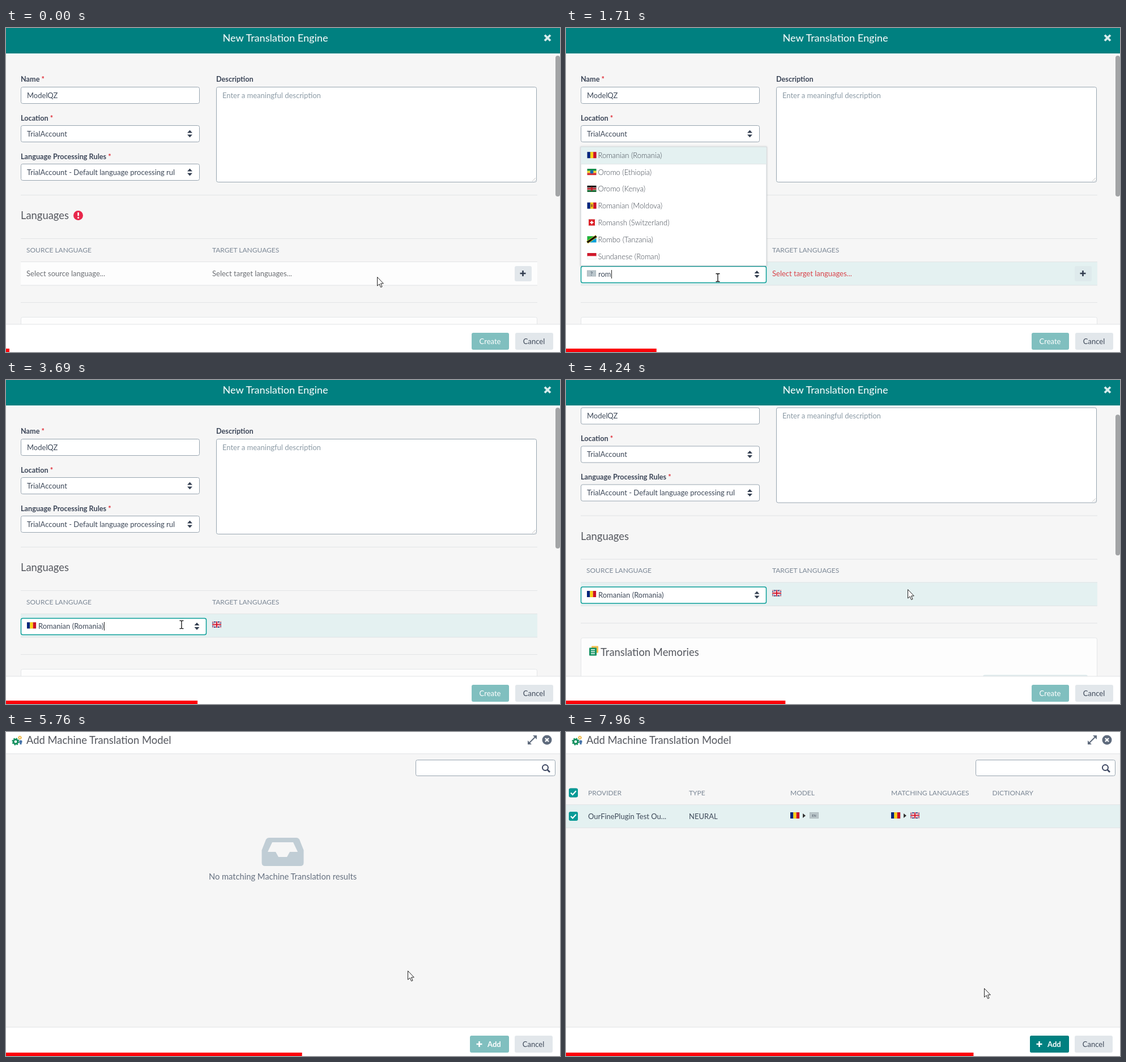
An HTML page that plays this animation: 978 by 573 pixels, repeating every 8 s.

```html
<!DOCTYPE html>
<html lang="en">
<head>
<meta charset="utf-8">
<title>New Translation Engine</title>
<style>
html, body { margin: 0; width: 100%; height: 100%; overflow: hidden; background: #f6f6f6; }
svg { display: block; }
text { font: 13px Lato, Carlito, sans-serif; fill: #3f4a5a; white-space: pre; }
.title { font-size: 18.1px; fill: #fff; }
.h { font-size: 18.4px; fill: #55585f; }
.label { font-size: 12.7px; font-weight: 700; fill: #3c4658; }
.caps { font-size: 12px; fill: #7c8896; }
.hint { fill: #8c9ba6; }
.prompt { fill: #6c6f74; }
.red { fill: #d9434a; }
.light { font-weight: 300; fill: #3f4650; }
.white { fill: #fff; }
.bold { font-weight: 700; }
.empty { font-size: 14.7px; fill: #667180; }
.mid { text-anchor: middle; }
.box { fill: #fff; stroke: #98a5b0; }
.edit { fill: #fff; stroke: #0a9e98; stroke-width: 1.5; }
.card { fill: #fdfdfd; stroke: #e4e6e8; }
.button { fill: #e2e7eb; }
.hovered .button { fill: #deeaec; }
.rule { fill: #e2e4e6; }
</style>
</head>
<body>
<svg id="stage" width="978" height="573" viewBox="0 0 978 573"></svg>
<script>
const LOOP = 8000;

// Basic shapes
const rect = (x, y, w, h, fill, r = 0) =>
  `<rect x="${x}" y="${y}" width="${w}" height="${h}" rx="${r}" fill="${fill}"/>`;
const box = (x, y, w, h, cls, r = 3) =>
  `<rect x="${x + .5}" y="${y + .5}" width="${w - 1}" height="${h - 1}" rx="${r}" class="${cls}"/>`;
const path = (d, fill, extra = '') => `<path d="${d}" fill="${fill}" ${extra}/>`;
const line = (d, color, width = 1) => path(d, 'none', `stroke="${color}" stroke-width="${width}"`);
const circle = (x, y, r, fill) => `<circle cx="${x}" cy="${y}" r="${r}" fill="${fill}"/>`;
const text = (x, middle, str, cls = '', size = 13) =>
  `<text x="${x}" y="${middle + size * .35}" class="${cls}">${str}</text>`;
const group = (id, ...parts) => `<g id="${id}">${parts.join('')}</g>`;
const at = (x, y, ...parts) => `<g transform="translate(${x} ${y})">${parts.join('')}</g>`;
const rule = (y, x = 26, w = 912) => `<rect x="${x}" y="${y}" width="${w}" height="1" class="rule"/>`;
const plus = (x, y, color = '#333e50') => line(`M${x - 5} ${y}h10M${x} ${y - 5}v10`, color, 2.6);
const arrows = (x, y) => path(`M${x - 4.5} ${y - 1.5}l4.5-5 4.5 5zM${x - 4.5} ${y + 1.5}l4.5 5 4.5-5z`, '#333e50');

// Flags, each 16 by 11
const columns = (...c) => c.map((f, i) => rect(i * 16 / c.length, 0, 16 / c.length + .1, 11, f)).join('');
const rows = (...c) => c.map((f, i) => rect(0, i * 11 / c.length, 16, 11 / c.length + .1, f)).join('');
const flags = {
  ro: columns('#00257e', '#fcd116', '#ce1126'),
  md: columns('#00257e', '#fcd116', '#ce1126') + rect(6.5, 3, 3, 5, '#a5672d'),
  et: rows('#12914a', '#f5d92d', '#d93035') + circle(8, 5.5, 3, '#1768b0'),
  ke: rows('#111', '#b3202c', '#14682f') + rect(0, 3.3, 16, .7, '#fff') + rect(0, 7, 16, .7, '#fff') +
    `<ellipse cx="8" cy="5.5" rx="1.8" ry="3.6" fill="#c0202c"/>`,
  ch: rect(2.5, 0, 11, 11, '#dc1f26') + path('M7 2.5h2v2h2v2H9v2H7v-2H5v-2h2z', '#fff'),
  tz: path('M0 0h16L0 11z', '#1eb53a') + path('M16 0v11H0z', '#00a3dd') +
    line('M0 11L16 0', '#fcd116', 5) + line('M0 11L16 0', '#111', 3.3),
  id: rows('#d2182b', '#fff'),
  ru: rows('#fff', '#1c49a8', '#d52b1e'),
  ua: rows('#1f66c4', '#fbd800'),
  gb: rect(0, 0, 16, 11, '#17307a') + line('M0 0L16 11M16 0L0 11', '#fff', 2.4) +
    line('M0 0L16 11M16 0L0 11', '#cf142b', .8) + line('M8 0V11M0 5.5H16', '#fff', 3.8) +
    line('M8 0V11M0 5.5H16', '#cf142b', 2),
  us: rows(...Array.from({ length: 7 }, (_, i) => i % 2 ? '#fff' : '#cf2436')) + rect(0, 0, 8, 6, '#2f3f87'),
  tn: rect(0, 0, 16, 11, '#e01020') + circle(8, 5.5, 3, '#fff') + circle(8, 5.5, 1.6, '#e01020'),
  frtn: rect(0, 0, 16, 11, '#e01020') + rect(0, 0, 5, 11, '#1d4595') + circle(8.5, 5.5, 3, '#fff') + circle(8.5, 5.5, 1.6, '#e01020'),
  re: rect(0, 0, 16, 11, '#1c4fae') + path('M0 11L8 4l8 7z', '#e0202c') + line('M0 0L8 5 16 0', '#e9eef5', 1.4),
  sc: rect(0, 0, 16, 11, '#0c63b4') + line('M0 0L16 11M16 0L0 11', '#fff', 2.2),
  any: rect(0, 0, 16, 11, '#b9c5cb') + `<text x="8" y="9" class="mid" style="font-size:9px">?</text>`,
  en: rect(0, 0, 16, 11, '#bac6c9') + `<text x="8" y="7.6" class="mid" style="font-size:5.5px">EN</text>`,
};
const flag = (code, x, y) => at(x, y, flags[code], '<path d="M.25.25h15.5v10.5H.25z" fill="none" stroke="#0002" stroke-width=".5"/>');

// Icons
const gear = (x, y, r, color) =>
  `<circle cx="${x}" cy="${y}" r="${r}" fill="none" stroke="${color}" stroke-width="${r * .75}"/>` +
  `<circle cx="${x}" cy="${y}" r="${r * 1.5}" fill="none" stroke="${color}" stroke-width="${r * .5}" stroke-dasharray="${r * .62} ${r * .558}"/>`;
const gears = (x, y) => at(x, y, gear(6, 11, 3.8, '#14905f'), gear(13.5, 4, 2, '#f0b53c'),
  circle(15, 11, 2.6, '#4472a8'), rect(13.5, 13, 3, 3, '#4472a8'));
const memory = (x, y) => at(x, y, rect(4, 0, 12, 12, '#f2bd4e', 1), rect(0, 3, 13, 14, '#159263', 1),
  line('M3 6.5h7M3 10h7M3 13.5h7', '#fff', 1.4));
const book = (x, y) => at(x, y, rect(0, 0, 15, 16, '#159263', 2), rect(3, 3, 10, 7, '#fff'),
  line('M4 9l2-4 2 4M9 8h3', '#159263', 1.2));
const trash = path('M870 431h10v1.6h-10zM873 429.5h4v1.5h-4zM871 433.5h8v6.5h-8z', '#333e50') +
  line('M873.5 434.5v4M876.5 434.5v4', '#dfe6ea', .8);
const pencil = path('M177 440l1-3.6 6.5-6.5 2.7 2.7-6.5 6.5zM185.2 429.2l1.3-1.2 2.7 2.7-1.2 1.2z', '#333e50');
const cross = (x, y, s, color, w) => line(`M${x - s} ${y - s}l${2 * s} ${2 * s}M${x + s} ${y - s}l${-2 * s} ${2 * s}`, color, w);

// Form parts
const label = (x, y, str, star = true) => text(x, y, str + (star ? ' <tspan fill="#e02b35">*</tspan>' : ''), 'label');
const select = (y, value) => box(26, y, 316, 30, 'box') +
  `<svg x="30" y="${y}" width="269" height="30">${text(7, 15, value)}</svg>` + arrows(324.5, y + 15);
const button = (x, y, w, content, fill) =>
  (fill ? rect(x, y, w, 30, fill, 3) : `<rect x="${x}" y="${y}" width="${w}" height="30" rx="3" class="button"/>`) + content;
const card = (y, h, icon, x, title) => box(26, y, 912, h, 'card') + icon + text(x, y + 26, title, 'h', 18.4);
const editor = (id, x, w, textX) => group(id, box(x, 421, w, 30, 'edit'), arrows(x + w - 17, 435.5),
  `<g id="${id}Flag"></g>`, `<text id="${id}Text" x="${textX}" y="440"></text>`,
  `<rect id="${id}Caret" y="428" width="1" height="15" fill="#222"/>`);

const list = (id, x, w, lastY, items, scrolls) => {
  const rowY = i => lastY - 29.8 * (items.length - 1 - i);
  const top = rowY(0) - 15;
  return group(id,
    `<rect x="${x}" y="${top}" width="${w}" height="${420.5 - top}" fill="#fff" stroke="#c9d0d4" filter="url(#shadow)"/>`,
    rect(x + .5, top + .5, w - (scrolls ? 14 : 1), 30, '#e4f1f1'), rule(top + 30, x, w - (scrolls ? 14 : 1)),
    scrolls ? rect(x + w - 11, top + 3, 8, 260, '#a2a4a6', 4) : '',
    ...items.map(([code, name], i) => flag(code, x + 11.5, rowY(i) - 6) + text(x + 30.5, rowY(i), name, 'light')));
};

const romLanguages = [['ro', 'Romanian (Romania)'], ['et', 'Oromo (Ethiopia)'], ['ke', 'Oromo (Kenya)'],
  ['md', 'Romanian (Moldova)'], ['ch', 'Romansh (Switzerland)'], ['tz', 'Rombo (Tanzania)'], ['id', 'Sundanese (Roman)']];
const rLanguages = [...romLanguages, ['ru', 'Russian (Russia)'], ['ua', 'Russian (Ukraine)'], ['tz', 'Rwa (Tanzania)']];
const uniLanguages = [['gb', 'English (United Kingdom)'], ['tn', 'Arabic (Tunisia)'], ['gb', 'Cornish (United Kingdom)'],
  ['us', 'English (United States)'], ['re', 'French (Réunion)'], ['frtn', 'French (Tunisia)'], ['us', 'Hawaiian (United States)'],
  ['us', 'Lakota (United States)'], ['sc', 'Scottish Gaelic (United Kingdom)'], ['us', 'Spanish (United States)']];

const form = group('form',
  label(26, 90.5, 'Name'), box(26, 104, 316, 30, 'box'), text(37, 119, 'ModelQZ'),
  label(26, 159, 'Location'), select(172, 'TrialAccount'),
  label(26, 227, 'Language Processing Rules'), select(240, 'TrialAccount - Default language processing rules'),
  label(371, 90.5, 'Description', false), box(371, 104, 566, 169, 'box'),
  text(382, 119, 'Enter a meaningful description', 'hint'), line('M929 271l6-6M933 271l2-2', '#aaa', .7),
  rule(295), text(26, 332, 'Languages', 'h', 18.4),
  group('error', circle(127.5, 331.5, 8.5, '#e8274b'), rect(126.3, 326, 2.6, 6.6, '#fff', 1), circle(127.6, 335.6, 1.5, '#fff')),
  rule(372), text(36, 392.5, 'SOURCE LANGUAGE', 'caps', 12), text(364, 392.5, 'TARGET LANGUAGES', 'caps', 12),
  rect(26, 413, 912, 42, '#fdfdfd'), group('rowTint', rect(26, 413, 912, 42, '#e4f1f1')), rule(413), rule(454.5),
  group('sourcePrompt', text(36, 434, 'Select source language...', 'prompt')),
  group('targetPrompt', text(364, 434, 'Select target languages...', 'prompt')),
  group('sourceValue', flag('ro', 36, 427.5), text(55, 434, 'Romanian (Romania)'), pencil),
  group('targetValue', flag('gb', 364, 427)),
  group('addRow', `<rect x="898" y="421" width="30" height="27" rx="3" class="button"/>`, plus(912.5, 434)),
  group('removeRow', `<rect x="861" y="421" width="29" height="27" rx="3" class="button"/>`, trash),
  rule(485),
  card(511, 112, memory(41, 526), 61, 'Translation Memories'),
  button(736, 577, 185, plus(752, 592) + text(767, 592, 'Add Translation Memory')),
  card(638, 144, gears(41, 654), 64.5, 'Machine Translation'), rule(706, 41, 880),
  button(680, 721, 226, plus(697, 736) + text(712, 736, 'Add Machine Translation Model')),
  card(797, 112, book(41, 812), 61, 'Termbases'),
  editor('source', 26, 328, 57), editor('target', 355, 493, 364.5),
  list('listR', 26, 328, 404, rLanguages), list('listRom', 26, 328, 404, romLanguages),
  list('listUni', 355, 493, 407, uniLanguages, true));

const checkbox = (y, id) => box(5, y - 8, 16, 16, 'box') +
  group(id, rect(5, y - 8, 16, 16, '#089a96', 3), line(`M8.5 ${y}l3.2 3.4 6-6.6`, '#fff', 2.2));
const pair = (x, to) => flag('ro', x, 142) + path(`M${x + 22} 144l5 4-5 4z`, '#333') + flag(to, x + 34, 142);

const modal = group('modal',
  rect(0, 0, 978, 573, '#f6f6f6'), rect(0, 0, 978, 38, '#fff'), rule(38, 0, 978),
  gears(11, 6), text(36, 14.5, 'Add Machine Translation Model', 'h', 18.4),
  line('M924 19l10-10', '#5f6b7d', 2), path('M921 22v-7l7 7zM937 6v7l-7-7z', '#5f6b7d'),
  circle(955, 14, 8.5, '#5f6b7d'), cross(955, 14, 3, '#fff', 2.4),
  box(723, 49, 247, 29, 'box'),
  `<circle cx="952" cy="63" r="5" fill="none" stroke="#3b4560" stroke-width="2"/>`, line('M955.5 66.5l4.5 4.5', '#3b4560', 2.6),
  group('noResults',
    path('M464 187h49q3 0 5 3l7.500 19v22q0 6-6 6h-62q-6 0-6-6v-22l7.500-19q2-3 5-3zM470 195l-8 17h14l5 9h15l5-9h14l-8-17z', '#c0cdd5', 'fill-rule="evenodd"'),
    text(488.5, 255.500, 'No matching Machine Translation results', 'empty mid', 14.7)),
  group('results',
    ...[[39, 'PROVIDER'], [217, 'TYPE'], [396, 'MODEL'], [574, 'MATCHING LANGUAGES'], [752.5, 'DICTIONARY']]
      .map(([x, name]) => text(x, 107.500, name, 'caps', 12)),
    rect(0, 128, 978, 42, '#fdfdfd'), group('resultTint', rect(0, 128, 978, 42, '#e4f1f1')), rule(128, 0, 978), rule(169, 0, 978),
    checkbox(107.5, 'checkAll'), checkbox(149, 'checkRow'),
    text(39, 149, 'OurFinePlugin Test Ou...'), text(217, 149, 'NEURAL'), pair(396, 'en'), pair(574, 'gb')),
  rect(0, 522, 978, 51, '#fff'), rule(521.5, 0, 978),
  button(819, 537, 69, '', '#80bfbf'), group('addReady', button(819, 537, 69, '', '#008080')),
  plus(835.5, 552, '#fff'), text(850, 552, 'Add', 'white bold'),
  button(898, 537, 67, text(931, 552, 'Cancel', 'mid')));

const cursors = group('cursor',
  group('arrow', path('M.5.5v15.500l3.600-3.200 2.500 5.700 2.400-1-2.500-5.600h4.800z', '#fff', 'stroke="#222"')),
  group('beam', line('M-3.500-6.500h2.500l1 1 1-1h2.500M0-5.500v12M-3.500 7.500h2.500l1-1 1 1h2.500', '#111', 1.3)),
  group('hand', path('M-2.500 1.500q1.800-2.500 3.500 0v6.500l6.500 1.500q1.500.5 1.300 3l-1.300 5.500v4h-9v-3l-5.500-7q-1-2.500 1.500-2l3 2.500z', '#fff', 'stroke="#222" stroke-width="1.200"'),
    line('M1 8v4M3.500 8.700v3.300M6 9.500v2.500', '#222')));

document.getElementById('stage').innerHTML = `
  <defs><clipPath id="view"><path d="M0 45h978v479H0z"/></clipPath>
  <filter id="shadow"><feDropShadow dx="0" dy="0" stdDeviation="1.5" flood-opacity=".2"/></filter></defs>` +
  rect(0, 0, 978, 573, '#f6f6f6') + `<g clip-path="url(#view)">${form}</g>` +
  group('thumb', rect(970, 49, 8, 249, '#a2a4a6', 4)) +
  rect(0, 0, 978, 45, '#008080') + text(475.5, 17.5, 'New Translation Engine', 'title mid', 18) + cross(956, 17.5, 5, '#d9ecec', 3.8) +
  rect(0, 524, 978, 49, '#fff') + rule(523.5, 0, 978) +
  button(822, 539, 66, text(854.5, 554, 'Create', 'white mid'), '#80bfbf') + button(899, 539, 67, text(932, 554, 'Cancel', 'mid')) +
  modal + cursors + `<rect id="bar" y="567" height="6" fill="#fb0007"/>`;

const el = Object.fromEntries([...document.querySelectorAll('[id]')].map(e => [e.id, e]));
const show = (id, on) => { el[id].style.display = on ? '' : 'none'; };

const bursts = [[80, 820, 12], [910, 1710, 13], [1770, 2530, 12], [2580, 3360, 12], [3420, 4170, 12],
  [4240, 5000, 12], [5070, 5840, 12], [5890, 6650, 12], [6720, 7480, 12], [7570, 7960, 7]];
const updates = bursts.flatMap(([from, to, n]) =>
  Array.from({ length: n }, (_, i) => from + i * (to - from) / (n - 1)));

const pointer = [[80, 655, 440], [700, 268, 441], [3560, 268, 441], [4160, 603, 370], [4380, 603, 370],
  [4862, 718, 417], [5060, 720, 432], [5300, 720, 432], [5700, 709, 422], [6650, 709, 422],
  [7080, 660, 148], [7570, 660, 148], [7960, 738, 453]];
const scrolling = [[4120, 0], [4240, 55.5], [4640, 297]];
const smooth = u => u * u * (3 - 2 * u);

function follow(keys, t, ease = u => u) {
  const next = keys.findIndex(k => k[0] > t);
  if (next < 0) return keys[keys.length - 1].slice(1);
  if (next === 0) return keys[0].slice(1);
  const a = keys[next - 1], b = keys[next], u = ease((t - a[0]) / (b[0] - a[0]));
  return a.slice(1).map((v, i) => v + (b[i + 1] - v) * u);
}

function typed(word, keyTimes, t) {
  const pressed = keyTimes.filter(k => t >= k);
  return [word.slice(0, pressed.length), pressed[pressed.length - 1]];
}

function fillEditor(id, [value, since], t, code) {
  el[id + 'Text'].textContent = value;
  el[id + 'Flag'].innerHTML = code && value ? flag(code, 37, 428.5) : '';
  const x = +el[id + 'Text'].getAttribute('x') + el[id + 'Text'].getComputedTextLength();
  el[id + 'Caret'].setAttribute('x', x + .5);
  show(id + 'Caret', (t - since) % 1060 < 530);
}

const OPEN = 760, PICKED = 2050, TARGET = 2450, DONE = 3520, MODAL = 5200, LOADED = 6080, CHECKED = 7570;

function render(now) {
  const count = updates.filter(u => u <= now + 12).length;
  const t = count ? updates[count - 1] : 0;
  el.bar.setAttribute('width', 6 + 6.15 * count);

  const sourceOpen = t >= OPEN && t < PICKED, targetOpen = t >= TARGET && t < DONE, done = t >= DONE;
  show('rowTint', t >= 150);
  el.form.classList.toggle('hovered', t >= 150);
  show('error', !done);
  show('sourcePrompt', t < OPEN);
  show('targetPrompt', t < TARGET);
  el.targetPrompt.firstChild.setAttribute('class', t >= OPEN ? 'red' : 'prompt');
  show('sourceValue', t >= PICKED && !done);
  show('targetValue', done);
  show('addRow', !done);
  show('removeRow', t >= PICKED && !done);

  show('source', sourceOpen || done);
  if (sourceOpen) fillEditor('source', typed('rom', [1100, 1280, 1450], t).map(v => v ?? OPEN), t, 'any');
  if (done) fillEditor('source', ['Romanian (Romania)', DONE], t, 'ro');
  show('target', targetOpen);
  if (targetOpen) fillEditor('target', typed('uni', [2700, 2800, 2900], t).map(v => v ?? TARGET), t);
  show('listR', t >= 1100 && t < 1450);
  show('listRom', t >= 1450 && t < PICKED);
  show('listUni', t >= 2700 && !done);

  el.form.setAttribute('transform', `translate(0 ${-follow(scrolling, t)[0]})`);
  el.thumb.setAttribute('transform', `translate(0 ${follow(scrolling, t - 70)[0] * .53})`);

  show('modal', t >= MODAL);
  show('noResults', t < LOADED);
  show('results', t >= LOADED);
  show('resultTint', t >= 7000);
  for (const id of ['checkAll', 'checkRow', 'addReady']) show(id, t >= CHECKED);

  const [x, y] = follow(pointer, t, smooth);
  const overSource = x < 354;
  el.cursor.setAttribute('transform', `translate(${x} ${y})`);
  show('beam', overSource && (sourceOpen || done));
  show('hand', overSource && !sourceOpen && !done);
  show('arrow', !overSource);
}

const start = performance.now();
function tick() {
  render((performance.now() - start) % LOOP);
  requestAnimationFrame(tick);
}
tick();
</script>
</body>
</html>
```
